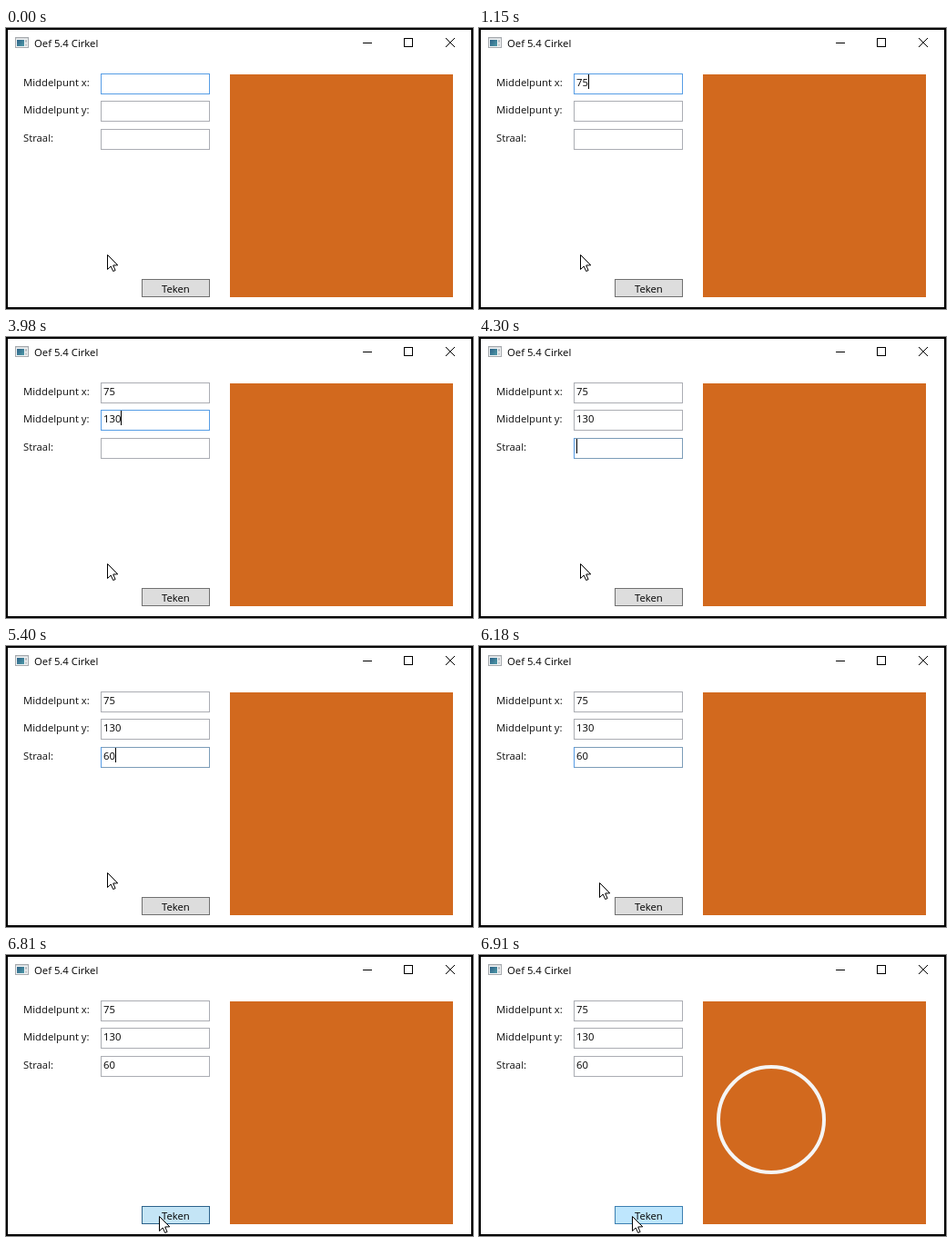
Animation, 513 px wide and 309 px high, one loop 9040 ms. Source, as an HTML page with a canvas:

```html
<!DOCTYPE html>
<html lang="nl">
<head>
<meta charset="utf-8">
<title>Cirkel</title>
<style>
  html, body { margin: 0; width: 100%; height: 100%; overflow: hidden; background: #fff; }
  canvas { display: block; }
</style>
</head>
<body>
<canvas id="stage" width="513" height="309"></canvas>
<script>
const ctx = document.getElementById('stage').getContext('2d', { alpha: false });
const LOOP = 9040;
const FONT = '11.3px "Open Sans", "Noto Sans", sans-serif';
const DIGIT = 6.47;

const fields = [
  { label: 'Middelpunt x:', y: 50, base: 64 },
  { label: 'Middelpunt y:', y: 80, base: 94 },
  { label: 'Straal:', y: 111, base: 125 }
];

// Each entry: start time, focused field, its text, caret visible
const typing = [
  [0, 0, '', false], [220, 0, '', true], [770, 0, '', false],
  [1010, 0, '7', true], [1150, 0, '75', true],
  [1700, 1, '', true], [2180, 1, '', false], [2720, 1, '', true],
  [3120, 1, '', false], [3200, 1, '1', true], [3740, 1, '13', true],
  [3980, 1, '130', true],
  [4300, 2, '', true], [4920, 2, '', false], [5240, 2, '6', true],
  [5400, 2, '60', true], [6020, 2, '60', false], [6810, 3, '', false]
];
const finals = ['75', '130', '60'];

// Each entry: start time, pointer tip
const pointer = [
  [0, 111, 249], [6090, 117, 252], [6170, 132, 260], [6250, 150, 270],
  [6320, 161, 278], [6410, 165, 284], [6490, 166, 287], [6650, 168, 287]
];
const HOVER = 6320, PRESS = 6810, RELEASE = 6910;

const at = (steps, t) => steps.reduce((found, s) => s[0] <= t ? s : found);

function rect(x, y, w, h, color) {
  ctx.fillStyle = color;
  ctx.fillRect(x, y, w, h);
}

function box(x, y, w, h, border, fill) {
  rect(x, y, w, h, border);
  rect(x + 1, y + 1, w - 2, h - 2, fill);
}

function text(str, x, y, color = '#111') {
  ctx.fillStyle = color;
  ctx.fillText(str, x, y);
}

function line(...points) {
  ctx.beginPath();
  points.forEach(([x, y], i) => i ? ctx.lineTo(x, y) : ctx.moveTo(x, y));
}

function drawWindow() {
  rect(0, 0, 513, 309, '#000');
  rect(2, 2, 509, 305, '#fff');

  box(10, 10, 15, 12, '#a5a9ad', '#f2f4f5');
  rect(11, 11, 13, 1, '#d5d9dc');
  const screen = ctx.createLinearGradient(12, 13, 20, 20);
  screen.addColorStop(0, '#2c6187');
  screen.addColorStop(1, '#4f9aa8');
  rect(12, 13, 8, 7, screen);
  rect(21, 13, 2, 3, '#b8bec3');
  rect(21, 17, 2, 3, '#c9ced2');

  text('Oef 5.4 Cirkel', 31, 21, '#000');
  rect(392, 16, 10, 1, '#000');
  box(437, 11, 10, 10, '#000', '#fff');
  ctx.strokeStyle = '#000';
  ctx.lineWidth = 1;
  line([483, 11], [493, 21]);
  ctx.stroke();
  line([493, 11], [483, 21]);
  ctx.stroke();
}

function drawFields(t) {
  const [, focus, typed, caret] = at(typing, t);
  fields.forEach(({ label, y, base }, i) => {
    const active = i === focus;
    const value = active ? typed : i < focus ? finals[i] : '';
    text(label, 19, base);
    const focusBorder = i === 2 ? '#7c9cb8' : '#569de5';
    box(104, y, 120, 23, active ? focusBorder : '#abadb3', '#fff');
    if (active) rect(104, y, 1, 23, '#569de5');
    text(value, 107, base, '#000');
    if (active && caret) {
      rect(Math.round(107 + value.length * DIGIT - 0.1), y + 1, 1, 16, '#000');
    }
  });
}

function drawButton(t) {
  let border = '#707070', fill = '#dddddd';
  if (t >= PRESS && t < RELEASE) [border, fill] = ['#2c628b', '#c4e5f6'];
  else if (t >= HOVER) [border, fill] = ['#3c7fb1', '#bee6fd'];
  box(149, 276, 75, 20, border, fill);
  text('Teken', 171, 291, '#000');
}

function drawCanvas(t) {
  rect(246, 51, 245, 245, '#d2691e');
  if (t < RELEASE) return;
  ctx.strokeStyle = '#f5f5f5';
  ctx.lineWidth = 4;
  ctx.beginPath();
  ctx.arc(246 + 75, 51 + 130, 58, 0, Math.PI * 2);
  ctx.stroke();
}

function drawPointer(t) {
  const [, x, y] = at(pointer, t);
  ctx.save();
  ctx.translate(x + 0.5, y + 0.5);
  line([0, 0], [0, 16], [3.7, 12.5], [6.2, 18], [8.6, 17], [6.2, 11.5], [11.3, 11.3]);
  ctx.closePath();
  ctx.fillStyle = '#fff';
  ctx.fill();
  ctx.strokeStyle = '#000';
  ctx.lineWidth = 1;
  ctx.stroke();
  ctx.restore();
}

function frame(now) {
  const t = now % LOOP;
  ctx.font = FONT;
  drawWindow();
  drawFields(t);
  drawButton(t);
  drawCanvas(t);
  drawPointer(t);
  requestAnimationFrame(frame);
}
requestAnimationFrame(frame);
</script>
</body>
</html>
```
